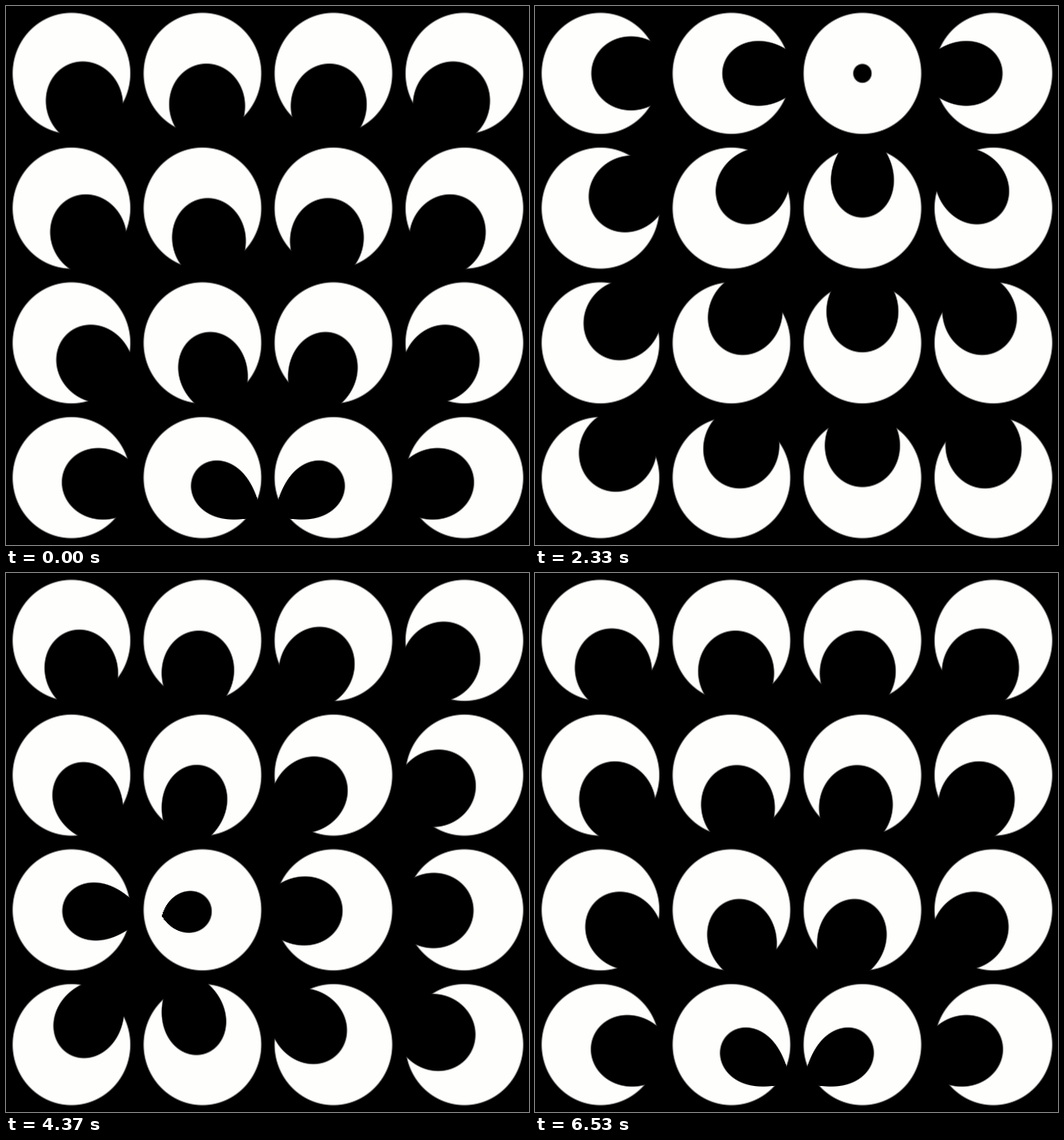
Write an HTML page with a canvas that moves like this. It is 604 px wide and 622 px high and loops after 6560 ms.

```html
<!DOCTYPE html>
<html lang="en">
<head>
<meta charset="utf-8">
<title>Watching eyes</title>
<style>
html, body { margin: 0; width: 100%; height: 100%; overflow: hidden; background: #000; }
canvas { display: block; width: 604px; height: 622px; }
</style>
</head>
<body>
<canvas id="stage" width="604" height="622"></canvas>
<script>
const W = 604, H = 622, LOOP = 6560, END = 6530;
const CELL_W = 151.25, CELL_H = 155.5;
// Radii and gaze shift, in cells; SHARP is edge contrast per cell
const EYE = 0.449, PUPIL = 0.312, SHIFT = 0.242, SHARP = 85;
const WHITE = [254, 254, 252];

// The gaze circles the middle: time in ms, radius in cells, angle in turns
const TURNS = 4, DIP = 0.35;
const keys = [
  [0, 1.81, 0.25], [970, 1.527, -0.6544], [2330, 1.581, -1.1988],
  [3370, 1.5, -2.0498], [4370, 0.977, -2.5945], [5130, 0.427, -2.9881]
];

const clamp = v => Math.max(0, Math.min(1, v));

function key(i) {
  const n = keys.length, lap = Math.floor(i / n);
  const [t, r, a] = keys[i - lap * n];
  return [t + lap * END, r, a - lap * TURNS];
}

function gaze(t) {
  t %= END;
  let i = keys.length - 1;
  while (keys[i][0] > t) i--;
  const [a, b, c, d] = [-1, 0, 1, 2].map(k => key(i + k));
  const span = c[0] - b[0], s = (t - b[0]) / span;
  const ease = s * s * (3 - 2 * s);
  const slope = (p, q) => (q[2] - p[2]) / (q[0] - p[0]) * span;
  // The angle runs on smoothly, the radius sinks between two keys
  const turn = b[2] + (c[2] - b[2]) * ease
    + s * (1 - s) * ((1 - s) * slope(a, c) - s * slope(b, d));
  const r = (b[1] + (c[1] - b[1]) * ease) * (1 - DIP * Math.sin(Math.PI * s) ** 2);
  const angle = turn * 2 * Math.PI;
  return [r * Math.cos(angle), r * Math.sin(angle)];
}

const ctx = document.getElementById("stage").getContext("2d");
const image = ctx.createImageData(W, H);
const data = image.data;

// Place of each column or row: on the stage, and within its own cell
function axis(count, size) {
  const pos = Float32Array.from({ length: count }, (_, i) => (i + 0.5) / size - 2);
  return [pos, pos.map(u => u - Math.floor(u) - 0.5)];
}
const [posX, eyeX] = axis(W, CELL_W);
const [posY, eyeY] = axis(H, CELL_H);

const mask = new Float32Array(W * H);
for (let y = 0, n = 0; y < H; y++) {
  for (let x = 0; x < W; x++, n++) {
    mask[n] = clamp((EYE - Math.hypot(eyeX[x], eyeY[y])) * SHARP + 0.5);
    data[n * 4 + 3] = 255;
  }
}

// Every pixel is shifted along its own line to the gaze point
function draw(t) {
  const [tx, ty] = gaze(t);
  for (let y = 0, n = 0; y < H; y++) {
    const dy = ty - posY[y];
    for (let x = 0; x < W; x++, n++) {
      if (!mask[n]) continue;
      const dx = tx - posX[x];
      const k = SHIFT / (Math.sqrt(dx * dx + dy * dy) || 1);
      const px = eyeX[x] - dx * k, py = eyeY[y] - dy * k;
      const v = mask[n] * clamp((Math.sqrt(px * px + py * py) - PUPIL) * SHARP + 0.5);
      const o = n * 4;
      data[o] = WHITE[0] * v;
      data[o + 1] = WHITE[1] * v;
      data[o + 2] = WHITE[2] * v;
    }
  }
  ctx.putImageData(image, 0, 0);
}

const start = performance.now();
let last = -1;

function tick() {
  const t = Math.max(0, performance.now() - start) % LOOP;
  // 30 steps a second, on a 10 ms clock
  const step = Math.min(196, Math.floor(Math.floor(t / 10) * 0.3 + 0.11));
  if (step !== last) {
    last = step;
    draw(Math.round(step * 10 / 3) * 10);
  }
  requestAnimationFrame(tick);
}
tick();
</script>
</body>
</html>
```
